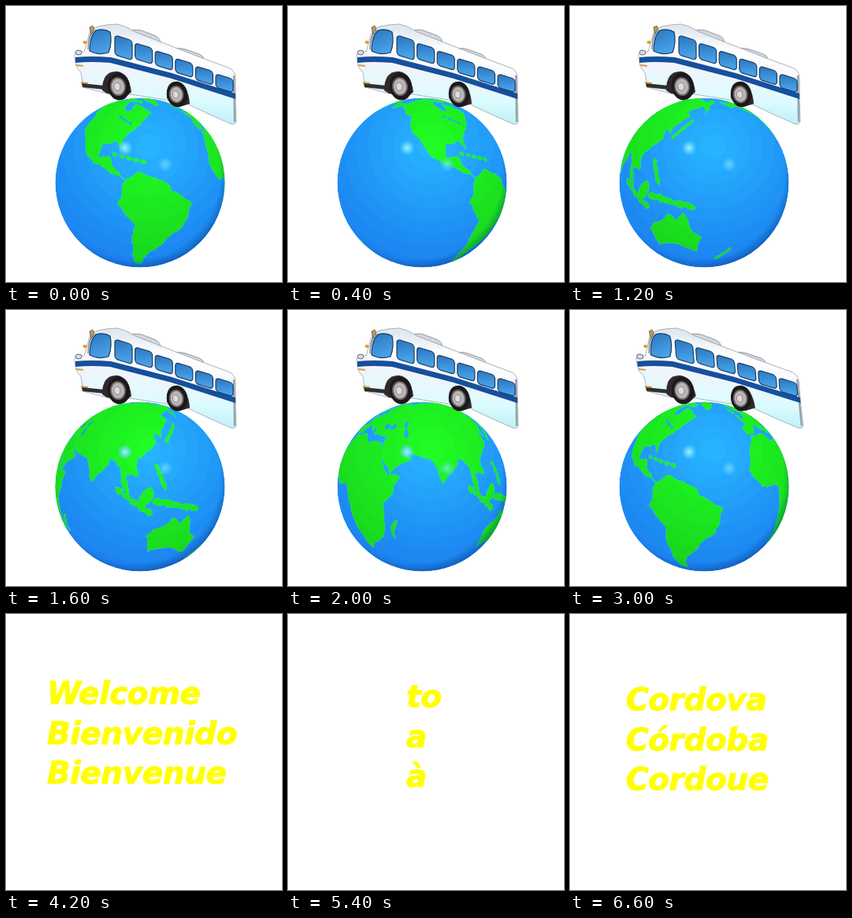
Write an HTML page that moves like this. It is 350 by 350 pixels and loops after 6.7 s.

```html
<!DOCTYPE html>
<html lang="en">
<head>
<meta charset="utf-8">
<title>Bus around the world</title>
<style>
html, body { margin: 0; width: 100%; height: 100%; overflow: hidden; background: #fff; }
svg { display: block; width: 100%; height: 100%; }
text { font: italic bold 39px "DejaVu Sans", sans-serif; letter-spacing: -.4px; fill: #ff0; stroke: #ff0; stroke-width: 1; }
</style>
</head>
<body>
<svg viewBox="0 0 350 350">
  <defs id="defs">
    <clipPath id="disc"><circle cx="170" cy="224" r="107.5"/></clipPath>
    <radialGradient id="glow">
      <stop offset="0" stop-color="#a0f4ff" stop-opacity=".95"/>
      <stop offset=".5" stop-color="#70e0ff" stop-opacity=".7"/>
      <stop offset="1" stop-color="#55ccff" stop-opacity="0"/>
    </radialGradient>
    <radialGradient id="rim" cx=".47" cy=".45" r=".57">
      <stop offset=".88" stop-color="#003070" stop-opacity="0"/>
      <stop offset="1" stop-color="#003070" stop-opacity=".5"/>
    </radialGradient>
    <linearGradient id="side" x1="0" y1="0" x2="-.25" y2="1">
      <stop offset="0" stop-color="#dfe9f0"/>
      <stop offset=".2" stop-color="#fff"/>
      <stop offset="1" stop-color="#e6e8f2"/>
    </linearGradient>
    <linearGradient id="skirt" x1="0" y1="0" x2="-.15" y2="1">
      <stop offset="0" stop-color="#f2f4fa"/>
      <stop offset=".5" stop-color="#dcfcff"/>
      <stop offset="1" stop-color="#aeeaf2"/>
    </linearGradient>
    <linearGradient id="glass" x1="0" y1="0" x2=".4" y2="1">
      <stop offset="0" stop-color="#2a74bc"/>
      <stop offset="1" stop-color="#48a2e8"/>
    </linearGradient>
  </defs>
  <g id="ride">
    <g clip-path="url(#disc)">
      <circle cx="170" cy="224" r="107.5" fill="url(#sea)"/>
      <path id="land" fill="url(#grass)" stroke="#34f28a" stroke-width=".8" stroke-linejoin="round" paint-order="stroke"/>
      <path id="lakes" fill="url(#sea)"/>
      <circle cx="170" cy="224" r="107.5" fill="url(#rim)"/>
      <circle cx="151" cy="180" r="10" fill="url(#glow)"/>
      <circle cx="202" cy="201" r="10" fill="url(#glow)" opacity=".55"/>
    </g>
    <g id="bus">
      <g id="body">
        <path d="M157 35Q158 28 172 31L190 38Q197 42 195 48ZM212 58Q214 51 228 55L245 61Q252 64 251 71Z" fill="#d3d6dc" stroke="#858890" stroke-width=".8"/>
        <path d="M107 31Q114 24 141 23Q152 25 164 33L246 65L284 79Q291 83 291 92V118L210 92L132 72L88 70Q86 62 88 60Q93 58 99 58Z" fill="url(#side)" stroke="#9a9ca8" stroke-width=".8"/>
        <path d="M88 70L132 71L210 91L291 117L292 146Q291 152 284 149Q258 138 232 125L203 119L158 112L124 110L98 103L95 84Q88 78 88 70Z" fill="url(#skirt)" stroke="#9aa4ae" stroke-width=".8"/>
        <path d="M289 88L290 147" stroke="#98a2ac" stroke-width="2.4"/>
        <path d="M88 65Q108 63 133 65L210 85L291 111V118L210 92L132 72Q108 70 88 72Z" fill="#164f9d"/>
        <path d="M106 57Q106 38 114 31Q124 28 132 33Q135 46 130 59Q117 63 106 57Z" fill="url(#glass)" stroke="#173a62" stroke-width="1.2"/>
        <path d="M104 55Q104 39 111 30" fill="none" stroke="#777b84" stroke-width="1.3"/>
        <g id="windows" fill="url(#glass)" stroke="#193c64" stroke-width="1.2"/>
        <path d="M106 27l4-2 2 5-4 6z" fill="#b99a54" stroke="#54483a" stroke-width=".7"/>
        <ellipse cx="100" cy="46" rx="2.5" ry="2" fill="#e79525"/>
        <ellipse cx="92" cy="59" rx="4" ry="3" fill="#d9dce4" stroke="#686b76"/>
        <path d="M89 75l9 1M95 97l9 1" stroke="#dc9a4c" stroke-width="2"/>
        <path d="M96 98L125 101V106L97 103Z" fill="#342d30"/>
        <path d="M122 107Q122 82 141 83Q156 85 159 109L151 116L128 111Z" fill="#30282b"/>
        <path d="M204 117Q202 95 217 96Q231 99 233 124L220 128Z" fill="#30282b"/>
      </g>
      <g id="wheels"/>
    </g>
  </g>
  <g id="words"></g>
</svg>
<script>
const $ = id => document.getElementById(id);
const STEP = 200, LOOP = 6700, RAD = Math.PI / 180;

let seed = 11;
function random() {
  seed = (seed * 16807) % 2147483647;
  return seed / 2147483647;
}

// Key corners of each land as longitude, latitude, clockwise
const northAmerica = [-168,66, -128,70, -95,69, -94,58, -81,53, -78,62, -66,59, -57,52, -67,45, -79,36, -83,31, -83,25,
  -87,30, -98,29, -99,20, -91,21, -88,15, -79,8, -93,14, -109,21, -116,31, -125,40, -126,49, -148,60, -162,57];
const southAmerica = [-79,8, -72,12, -60,9, -50,1, -36,-6, -40,-20, -49,-27, -58,-37, -67,-45, -69,-54, -76,-52, -75,-35,
  -73,-18, -84,-6, -81,2];
const eurasia = [-9,37, -9,43, -2,44, -4,48, 8,54, 24,59, 13,56, 6,60, 14,68, 28,71, 44,67, 70,72, 104,77, 140,72, 180,68,
  163,60, 157,51, 155,60, 136,54, 140,49, 128,40, 127,35, 121,39, 122,31, 108,21, 109,12, 100,13, 103,2, 97,17, 90,22,
  78,8, 72,21, 57,25, 50,30, 58,22, 44,13, 35,29, 36,36, 27,37, 22,37, 14,45, 17,39, 9,44, -1,37];
const africa = [-6,36, 10,37, 20,31, 33,31, 43,12, 51,12, 40,-4, 40,-15, 33,-27, 20,-35, 13,-15, 9,4, -8,5, -17,15, -10,30];
const australia = [114,-23, 131,-12, 137,-16, 142,-11, 153,-26, 149,-38, 138,-34, 130,-32, 116,-35];
const greenland = [-60,78, -25,80, -24,70, -44,60, -53,69];
const madagascar = [49,-13, 46,-25, 44,-18];

// Ragged coast between two corners
function ragged(x, y, u, v) {
  const dx = u - x, dy = v - y;
  if (Math.hypot(dx, dy) < 2.5) return [[x, y]];
  const sway = (random() - .5) * .26;
  const mx = x + dx / 2 - dy * sway, my = y + dy / 2 + dx * sway;
  return [...ragged(x, y, mx, my), ...ragged(mx, my, u, v)];
}
const coast = keys => keys.flatMap((x, i) => i % 2 ? [] :
  ragged(x, keys[i + 1], keys[(i + 2) % keys.length], keys[(i + 3) % keys.length]));

// A row of uneven blobs from one place to another
function chain(x, y, u, v, count, size) {
  const angle = Math.atan2(v - y, u - x), c = Math.cos(angle), s = Math.sin(angle);
  return Array.from({ length: count }, (_, i) => {
    const k = count > 1 ? i / (count - 1) : 0;
    return Array.from({ length: 11 }, (_, j) => {
      const a = -j / 11 * 2 * Math.PI, r = size * (.65 + random() * .6);
      const along = 1.7 * r * Math.cos(a), across = r * Math.sin(a);
      return [x + (u - x) * k + along * c - across * s, y + (v - y) * k + along * s + across * c];
    });
  });
}
const lands = [
  ...[northAmerica, southAmerica, eurasia, africa, australia, greenland, madagascar].map(coast),
  ...chain(97, 4, 115, -8, 5, 1.7),
  ...chain(113, 0, 116, 4, 1, 3.8),
  ...chain(121, -2, 146, -7, 5, 2.2),
  ...chain(121, 17, 125, 7, 4, 1.5),
  ...chain(131, 33, 143, 44, 6, 1.3),
  ...chain(168, -45, 176, -38, 3, 1.6),
  ...chain(-87, 22, -68, 18, 5, 1.1),
  ...chain(-4, 51, -5, 58, 2, 2),
  ...chain(-110, 73, -68, 67, 5, 3)];
const lakes = [
  ...chain(31, 43, 38, 43, 2, 2),
  ...chain(50, 45, 52, 38, 2, 2),
  ...chain(-91, 48, -79, 43, 4, 1.2)];

// Banded shading shared by sea and land
function bands(id, from, to, count) {
  let stops = "";
  for (let i = 0; i < count; i++) {
    const k = i / (count - 1);
    const color = from.map((c, j) => Math.round(c + (to[j] - c) * k));
    for (const edge of [i, i + 1])
      stops += `<stop offset="${edge / count}" stop-color="rgb(${color})"/>`;
  }
  $("defs").innerHTML += `<radialGradient id="${id}" gradientUnits="userSpaceOnUse" cx="181" cy="178" r="158">${stops}</radialGradient>`;
}
bands("sea", [38, 180, 255], [28, 130, 240], 10);
bands("grass", [32, 252, 36], [24, 212, 28], 10);

// Perspective view of the sphere; hidden points slide just past the rim
const TILT = 7 * RAD, EYE = 9, R = 107.5;
function project(lon, lat, turn) {
  const a = Math.min(88, lat * 1.1) * RAD, b = (lon - turn) * RAD;
  const x = Math.cos(a) * Math.sin(b), depth = Math.cos(a) * Math.cos(b);
  const y = Math.sin(a) * Math.cos(TILT) - depth * Math.sin(TILT);
  const z = Math.sin(a) * Math.sin(TILT) + depth * Math.cos(TILT);
  const seen = z > 1 / EYE;
  const k = seen ? R * Math.sqrt(EYE * EYE - 1) / (EYE - z) : (R + 4) / Math.hypot(x, y);
  return { x: 170 + x * k, y: 224 - y * k, seen };
}
function outline(shape, turn) {
  const points = shape.map(([lon, lat]) => project(lon, lat, turn));
  if (!points.some(p => p.seen)) return "";
  return "M" + points.map(p => p.x.toFixed(1) + " " + p.y.toFixed(1)).join("L") + "Z";
}
const trace = (id, shapes, turn) => $(id).setAttribute("d", shapes.map(s => outline(s, turn)).join(""));

for (let i = 0; i < 6; i++) {
  const height = 17 + 8 * .4 ** i;
  $("windows").innerHTML += `<rect width="22" height="${height}" rx="4"
    transform="translate(${138 + 25.6 * i} ${37 + 9.8 * i}) skewY(17)"/>`;
}

const wheel = (x, y, s) => `<g transform="translate(${x} ${y}) rotate(-8) scale(${s})">
  <ellipse rx="14" ry="17.5" fill="#1d191b"/>
  <ellipse cx="-1" rx="10" ry="12" fill="#6e6a6c"/>
  <ellipse cx="-1" rx="8" ry="10" fill="#bab6b8"/>
  <ellipse cx="-2" rx="4" ry="5" fill="#dedada" stroke="#8b8789"/></g>`;
$("wheels").innerHTML = wheel(143, 102, 1) + wheel(217, 112, .93);

const cards = [
  { from: 4200, x: 52, y: 114, lines: ["Welcome", "Bienvenido", "Bienvenue"] },
  { from: 5400, x: 150, y: 118, lines: ["to", "a", "à"] },
  { from: 6600, x: 71, y: 122, lines: ["Cordova", "Córdoba", "Cordoue"] }];
$("words").innerHTML = cards.map(c => "<g>" + c.lines.map((line, i) =>
  `<text x="${c.x}" y="${c.y + i * 50.5}">${line}</text>`).join("") + "</g>").join("");
const cardNodes = [...$("words").children];

// The bus hops, settles, leans back, settles
const hops = ["", "translate(5 -8)", "", ""];
const leans = ["", "", "", "matrix(1 0 .08 1 -8 0)"];

let shown = -1;
function draw(time) {
  const step = Math.min(15, Math.floor(time / STEP));
  const card = cards.filter(c => time >= c.from).length;
  $("ride").style.display = card ? "none" : "";
  cardNodes.forEach((node, i) => node.style.display = i === card - 1 ? "" : "none");
  if (step === shown) return;
  shown = step;
  const turn = -70 - 22.5 * step;
  trace("land", lands, turn);
  trace("lakes", lakes, turn);
  $("bus").setAttribute("transform", hops[step % 4]);
  $("body").setAttribute("transform", leans[step % 4]);
}

const start = performance.now();
function tick() {
  draw((performance.now() - start) % LOOP);
  requestAnimationFrame(tick);
}
tick();
</script>
</body>
</html>
```
